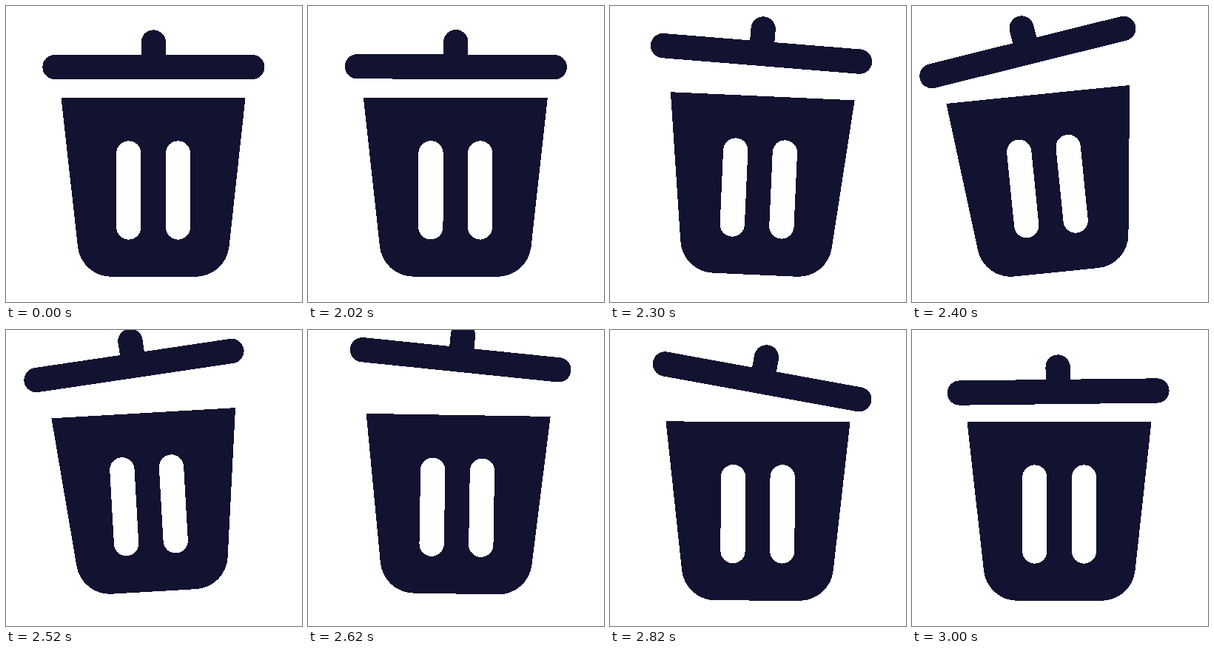
Recreate the animation shown at these times as an HTML page. Size 400 by 400 pixels, loop 3.02 s.

```html
<!DOCTYPE html>
<html>
<head>
<meta charset="utf-8">
<style>
  html, body { margin: 0; width: 100%; height: 100%; overflow: hidden; background: #fff; }
  svg { display: block; width: 100vw; height: 100vh; shape-rendering: crispEdges; }
  .bar { fill: none; stroke: #121331; stroke-width: 33.3; stroke-linecap: round; }
  .slot { stroke: #fff; }
</style>
</head>
<body>
<svg viewBox="0 0 400 400">
  <g id="bin">
    <path fill="#121331" d="M74.5 124.2H323.5L301.5 325.5A45.5 45.5 0 0 1 256.5 365.8H142A45.5 45.5 0 0 1 97 325.5Z"/>
    <path class="bar slot" d="M165.8 199V299M232.5 199V299"/>
  </g>
  <path id="lid" class="bar" d="M66 82.5H332.8M199.3 49V82.5"/>
</svg>
<script>
const LOOP = 3020, START = 2000, FIRST_STEP = 2020;
const RIGHT = 2240, LEFT = 2425; // when the bin leans furthest each way
const bin = document.getElementById('bin'), lid = document.getElementById('lid');

const clamp = u => Math.max(0, Math.min(1, u));
const ease = u => (1 - Math.cos(Math.PI * clamp(u))) / 2;
const glide = (t, from, to, t0, t1) => (to - from) * ease((t - t0) / (t1 - t0));

// Leans right, then left, swings back and settles
function swing(t, right, left, back, backTime, end, endTime) {
  return glide(t, 0, right, START, RIGHT)
    + glide(t, right, left, RIGHT, LEFT)
    + glide(t, left, back, LEFT, backTime)
    + glide(t, back, end, backTime, endTime);
}

function hop(t, height, t0, t1) {
  const u = clamp((t - t0) / (t1 - t0));
  return -4 * height * u * (1 - u);
}

function place(el, x, y, angle, px, py) {
  el.setAttribute('transform', `translate(${x} ${y}) rotate(${angle} ${px} ${py})`);
}

function draw(now) {
  let t = now % LOOP;
  if (t < FIRST_STEP) t = START;
  t = Math.min(t, 3000);

  const tilt = swing(t, 5.43, -6.25, 1.15, 2645, 0, 2900);
  const slide = swing(t, 0.86, -9.14, 1, 2575, 0, 2900);
  // The bin tips over whichever lower corner it leans towards
  place(bin, slide, hop(t, 10.1, 2430, 2700), tilt, tilt > 0 ? 256.5 : 142, 320.5);

  const lidTilt = swing(t, 11, -15, 14.1, 2730, -0.65, 3000);
  const lidX = swing(t, 21.65, -45.8, 12.3, 2670, -1.8, 3000);
  const lidY = swing(t, -17.5, -20.1, -43, 2590, 1, 2960);
  place(lid, lidX, lidY, lidTilt, 199.4, 82.5);
}

const begin = performance.now();
function tick() {
  draw(performance.now() - begin);
  requestAnimationFrame(tick);
}
tick();
</script>
</body>
</html>
```
